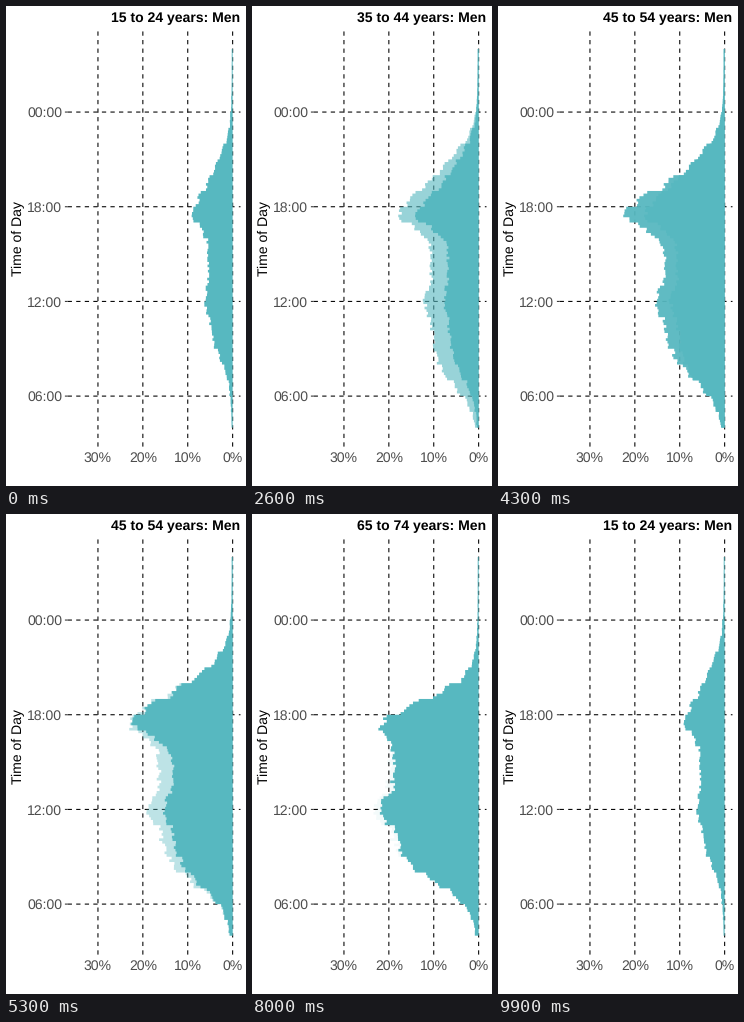
Animation of 240x480 px, one loop 10 s. Source, as a matplotlib script:

```python
import matplotlib.pyplot as plt
import numpy as np
from matplotlib.animation import FuncAnimation

plt.rcParams.update({"path.snap": False, "text.hinting": "none",
                     "font.family": "Liberation Sans"})

W, H, DPI = 240, 480, 80
PX = 72 / DPI                      # points per pixel
TEAL, GREY = "#57b8c0", "#4d4d4d"
LEFT, RIGHT, TOP, BOTTOM = 61.65, 234.5, 24, 440.6
BINS = 144                         # ten minutes each, from 04:00
FRAMES = 100

AGES = [f"{a} to {a + 9} years" for a in range(15, 75, 10)] + ["75 years and over"]
# per age: plateau %, evening peak %, hour of rise, hour of dusk
SHAPES = [(5.2, 3.4, 8.4, 21.2), (6.6, 7, 7.2, 21.4), (10.3, 7.3, 6.6, 21.3),
          (13.3, 8.8, 7.1, 20.6), (16.2, 7, 7.25, 20.2), (18.9, 5.5, 7.4, 18.9),
          (20, 4.5, 7.6, 18.3)]
# per age: first frame and number of steps of the fade to the next one
FADES = [(9, 6), (23, 7), (38, 7), (51, 7), (65, 7), (80, 6), (94, 6)]


def x_of(percent):
    """0 to 35 % with 5 % padding on both sides."""
    return RIGHT - (RIGHT - LEFT) * (0.05 + percent / 35) / 1.1


def y_of(hour):
    """04:00 to 28:00 with 5 % padding on both sides."""
    return BOTTOM - (BOTTOM - TOP) * (0.05 + (hour - 4) / 24) / 1.1


def sigmoid(x):
    return 1 / (1 + np.exp(-x / 0.9))


def bell(x, left, right):
    return np.exp(-0.5 * (x / np.where(x < 0, left, right)) ** 2)


def profile(plateau, peak, rise, dusk, rng):
    """Bar ends: a working day with a noon bump and an evening peak."""
    mid = 4 + (np.arange(BINS) + 0.5) / 6
    h = mid + 0.4 * (0.5 - mid % 1)            # small jumps at full hours
    share = plateau * sigmoid(h - rise) * sigmoid(dusk - h)
    share += peak * bell(h - 17.5, 0.8, 1.25)
    share += 0.17 * plateau * bell(h - 12, 0.6, 0.6)
    share += 0.15 * np.sqrt(share) * rng.uniform(-1, 1, BINS)
    return x_of(share + 0.2)


def label(x, y, text, color="black", **kw):
    return ax.text(x, y, text, size=14 * PX, color=color, va="baseline", **kw)


def line(xs, ys, color="black", **kw):
    ax.plot(xs, ys, color=color, lw=1.07 * PX, zorder=1, **kw)


rng = np.random.default_rng(24)
ends = [profile(*shape, rng) for shape in SHAPES]
edges = y_of(np.linspace(4, 28, BINS + 1))

fig = plt.figure(figsize=(W / DPI, H / DPI), dpi=DPI, facecolor="white")
ax = fig.add_axes([0, 0, 1, 1])
ax.set(xlim=(0, W), ylim=(H, 0))
ax.axis("off")

dashed = dict(ls=(0, (4, 4)), dash_capstyle="butt")
for percent in range(0, 40, 10):
    x = x_of(percent)
    line([x, x], [BOTTOM, TOP], **dashed)
    label(x, 455.7, f"{percent}%", GREY, ha="center")
for hour in range(6, 30, 6):
    y = y_of(hour)
    line([LEFT, RIGHT], [y, y], **dashed)
    line([LEFT - 2.75, LEFT], [y, y], "#333333", solid_capstyle="butt")
    label(56.1, y + 5, f"{hour % 24:02d}:00", GREY, ha="right")
label(15.6, 232.3, "Time of Day", ha="center", rotation=90,
      rotation_mode="anchor")
title = label(233.7, 15.7, "", weight="bold", ha="right")


def bars(zorder):
    return ax.stairs(ends[0], edges, baseline=x_of(0), fill=True, lw=0,
                     orientation="horizontal", color=TEAL, zorder=zorder)


current, entering = bars(2), bars(3)


def state_at(frame):
    """Current age group and progress of the fade to the next one."""
    for i, (start, steps) in enumerate(FADES):
        if frame < start + steps - 1:
            return i, max(0, frame - start + 1) / steps
    return 0, 0


def draw(frame):
    i, t = state_at(frame)
    j = (i + 1) % len(AGES)
    current.set_data(ends[i], edges, x_of(0))
    entering.set_data(ends[j], edges, x_of(0))
    entering.set_alpha((1 - np.cos(np.pi * t)) / 2)
    title.set_text(AGES[j if t >= 0.5 else i] + ": Men")
    return current, entering, title


anim = FuncAnimation(fig, draw, frames=FRAMES, interval=100, repeat=True,
                     repeat_delay=0)
plt.show()
```
